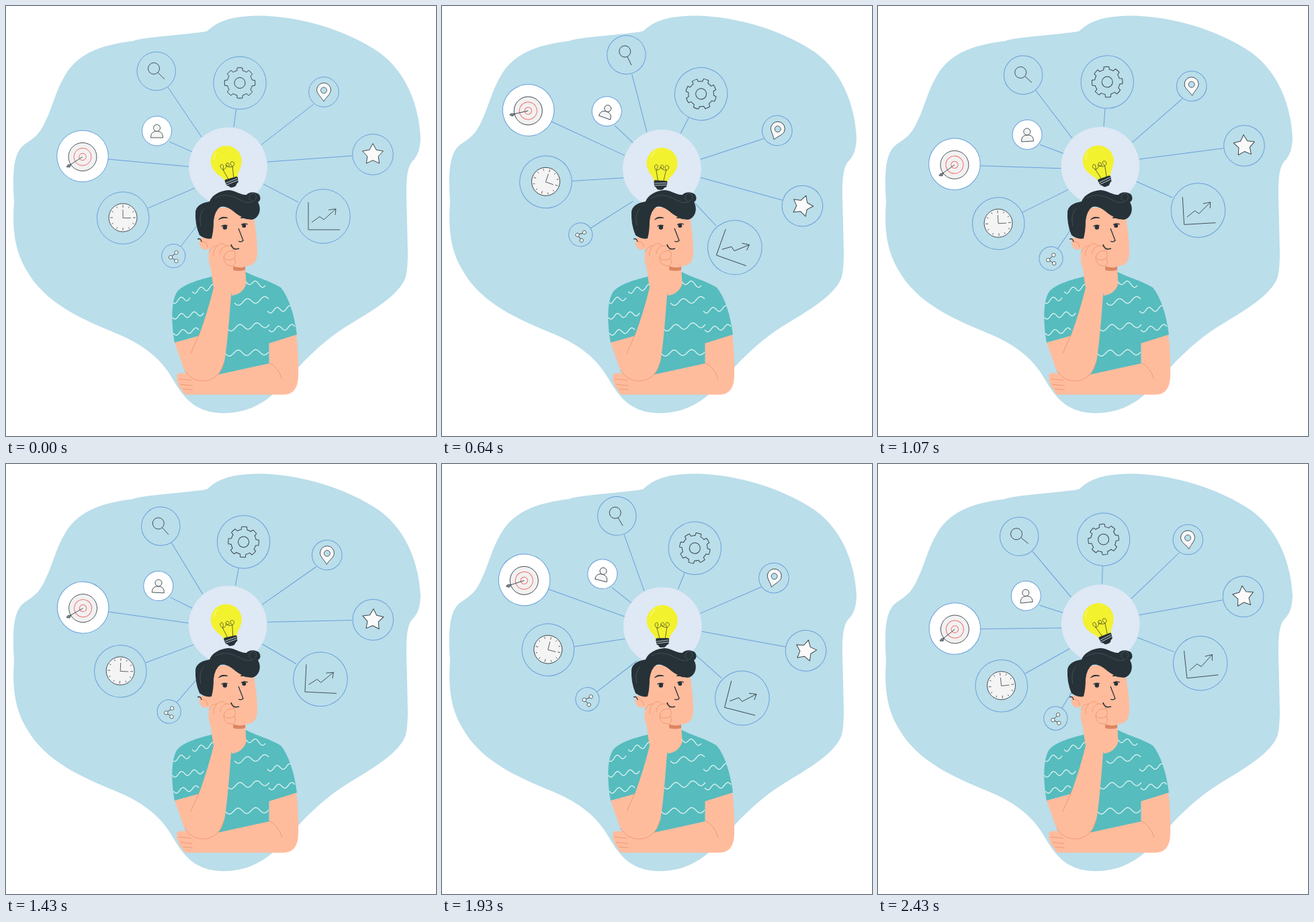
An HTML page with a canvas for the animation above (8000 ms loop, 640 by 640 pixels).

```html
<!DOCTYPE html>
<html lang="en">
<head>
<meta charset="utf-8">
<title>Thinking of ideas</title>
<style>
html, body { margin: 0; width: 100%; height: 100%; overflow: hidden; background: #fff; }
canvas { display: block; width: 640px; height: 640px; }
</style>
</head>
<body>
<canvas id="stage" width="640" height="640"></canvas>
<script>
const ctx = document.getElementById('stage').getContext('2d');
const LOOP = 8000, STEP = 500 / 7, LAST = 34;
const PIVOT = [319.5, 231.5];
const SKY = '#badeea', BLUE = '#6a9fdb', DARK = '#263238', INK = '#3a464c';
const SKIN = '#ffbc9d', FOLD = '#ee9a75', SHIRT = '#56bcbe', PALE = '#f4f4f4', RED = '#f26d6d';

// swing of the idea wheel: [step, degrees]
const KEYS = [[0, 0], [4, 10.9], [9, 19.6], [10, 19.9], [15, -3.3], [16.7, -6],
  [20, 2.75], [24, 18.1], [25, 19.1], [27, 14.45], [34, -6]];

function slope(i) {
  if (i < 1) return 2.9;
  if (i > KEYS.length - 2) return -1.5;
  const [a, b, c] = [KEYS[i - 1], KEYS[i], KEYS[i + 1]];
  const l = (b[1] - a[1]) / (b[0] - a[0]), r = (c[1] - b[1]) / (c[0] - b[0]);
  return l * r <= 0 ? 0 : 2 * l * r / (l + r);
}

function swing(k) {
  let i = 0;
  while (i < KEYS.length - 2 && k > KEYS[i + 1][0]) i++;
  const [x0, y0] = KEYS[i], [x1, y1] = KEYS[i + 1];
  const h = x1 - x0, u = (k - x0) / h, v = 1 - u;
  return y0 * v * v * (1 + 2 * u) + y1 * u * u * (3 - 2 * u)
    + h * u * v * (slope(i) * v - slope(i + 1) * u);
}

function paint(path, fill, line, width = 1) {
  if (fill) { ctx.fillStyle = fill; ctx.fill(path); }
  if (line) { ctx.strokeStyle = line; ctx.lineWidth = width; ctx.stroke(path); }
}
const shape = (d, fill, line, width) => paint(new Path2D(d), fill, line, width);

function disc(x, y, r, fill, line, width) {
  const p = new Path2D();
  p.arc(x, y, r, 0, 7);
  paint(p, fill, line, width);
}

function star(x, y, outer, inner) {
  const p = new Path2D();
  for (let i = 0; i < 10; i++) {
    const a = (i / 5 - 0.5) * Math.PI, r = i % 2 ? inner : outer;
    p.lineTo(x + r * Math.cos(a), y + r * Math.sin(a));
  }
  p.closePath();
  paint(p, '#fafafa', INK, 1);
}

function gear(x, y, teeth, outer, inner) {
  const p = new Path2D();
  for (let i = 0; i < teeth; i++) {
    const a = (i / teeth * 2 - 0.5) * Math.PI, half = Math.PI / teeth;
    p.arc(x, y, outer, a - 0.17, a + 0.17);
    p.arc(x, y, inner, a + 0.23, a + 2 * half - 0.23);
  }
  p.closePath();
  paint(p, null, INK, 1);
}

function wave(x0, y0, x1, y1, cycles, amp = 3.6) {
  const p = new Path2D();
  for (let i = 0; i <= 48; i++) {
    const u = i / 48;
    p.lineTo(x0 + (x1 - x0) * u, y0 + (y1 - y0) * u + amp * Math.sin(u * cycles * 2 * Math.PI));
  }
  paint(p, null, '#e0f3f3', 1.3);
}

function backdrop() {
  shape(`M300 37C320 17 352 14 384 14.500C442 17 503 36 546 63C594 91 615 147 617 197
    C616 216 612 224 604 232C592 247 597 291 597 323L598 368Q598 390 595 403
    C586 430 546 453 508 476C481 493 458 513 435 538C401 579 374 606 322 606
    C285 605 266 587 248 555C229 522 203 504 166 488C112 466 58 442 31 394
    C10 359 10 325 12 291C10 257 9 223 25 208C42 196 49 193 59 171
    C69 151 74 126 88 103C108 68 148 57 190 52C198 47 265 43 297 38Z`, SKY);
}

function bulb() {
  ctx.save();
  ctx.translate(327.8, 231);
  ctx.rotate(-0.27);
  shape('M-10 28C-11 21 -16 19 -19 13A23 23 0 1 1 19 13C16 19 11 21 10 28Z', '#f3f22f');
  shape('M-17 -7Q-15 -14 -10 -17', null, '#faf99a', 1);
  shape(`M-4 27L-8 11C-12 7 -11 3 -8 3C-5 3 -6 8 -8 11C-4 11 -2 9 -2 6C-2 2 3 2 3 6
    C3 10 -2 9 -1 6C0 9 4 11 7 10C4 7 5 2 8 3C12 4 11 9 7 10L4 27`, null, '#4d522c', 0.8);
  shape('M-10 28Q-10 26 -8 26H8Q10 26 10 28L9 35Q6 36 5 38Q4 40 1 40H-2Q-5 40 -6 37L-9 35Z', DARK);
  shape('M-9 31L9 29M-9 34L9 32', null, '#dce4ec', 0.8);
  ctx.restore();
}

function links() {
  shape(`M241 121L291 195M342.500 154L339 180M458 146L380 206.500M515 223L389 232
    M435 292L383 265M260 358L306 299M211 301L281 271M152 228L272 239M243 202L277 217`, null, BLUE, 1);
}

function rings() {
  const ring = (x, y, r, fill) => disc(x, y, r, fill, BLUE, 1);
  ring(223.7, 97, 28.7);
  ring(348, 114.5, 39.2);
  ring(473, 128, 22.3);
  ring(546, 221, 30.3);
  ring(472, 313, 40.3);
  ring(249.3, 372, 17.6);
  ring(174.2, 315.5, 38.8);
  ring(114, 223.5, 38.3, '#fff');
  ring(224.5, 186, 22, '#fff');
}

function icons() {
  const ink = (d, fill, w = 0.9) => shape(d, fill, INK, w);
  // magnifier
  disc(220, 93, 8.5, null, INK, 0.9);
  ink('M226 99L236 109');
  gear(348, 114.5, 8, 22.8, 18.8);
  disc(348, 114.5, 8, null, INK, 1);
  // map pin
  ink('M473 142C469 135 462.500 131 462.500 125A10.500 10.500 0 0 1 483.500 125C483.500 131 477 135 473 142Z', '#f8f8f8');
  disc(473, 125.5, 4.5, SKY, INK, 0.8);
  ctx.lineJoin = 'round';
  star(546, 221, 16.3, 8.6);
  // chart
  ink('M450 292V333H497M455 322L467 313.500L473 318L491 302M480 303.500L491 302L490 311');
  // share
  ink('M254 367L245 374L254 379.500');
  for (const [x, y] of [[245, 374], [253.5, 367], [253.5, 379.5]]) disc(x, y, 2.7, '#fff', INK, 0.8);
  // clock
  disc(174, 315, 21, PALE, INK, 0.9);
  for (let i = 0; i < 12; i++) {
    const a = i * Math.PI / 6, c = Math.cos(a), s = Math.sin(a), r = i % 3 ? 16.5 : 15;
    ink(`M${174 + r * c} ${315 + r * s}L${174 + 19 * c} ${315 + 19 * s}`, null, 0.8);
  }
  ink('M174 303V315.500H186', null, 0.8);
  // target
  disc(114, 224.5, 21, '#f1f1f1', INK, 0.9);
  disc(114, 224.5, 13, null, RED, 1);
  disc(114, 224.5, 5.2, null, RED, 1);
  ink('M114 224.500L92 238.500');
  ink('M97 235.500L95 240L90 239.500L92 236.500Z', '#78838a', 0.7);
  // person
  ink('M215.500 196C215.500 189 219 186.500 224.500 186.500C230 186.500 233.500 189 233.500 196Z', PALE);
  disc(224.5, 181.5, 5, PALE, INK, 0.9);
}

function wheel(deg) {
  ctx.save();
  ctx.translate(...PIVOT);
  ctx.rotate(deg * Math.PI / 180);
  ctx.translate(-PIVOT[0], -PIVOT[1]);
  links();
  disc(330.5, 239, 58.3, '#dfe8f5');
  rings();
  icons();
  bulb();
  ctx.restore();
}

function torso() {
  // folded arm
  shape(`M391 500L432 487Q436 520 435 552Q434 578 413 578.500H268Q263 577 262 571
    Q256 568 257 562Q252 558 255 554Q252 548 258 546.500Q268 545 281 550L318 547L392 531Z`, SKIN);
  shape('M257 555L276 557M259 563L277 565M263 570L278 571M391 531Q405 536 411 556', null, FOLD, 1);
  // shirt
  const shirt = new Path2D(`M309 402C289 407 266 413 255 425C245 439 246 473 251 501L288 491L300 552
    L318 548L391.500 532V502L433 489C429 459 421 434 409 419C391 408 372 404 357 396Z`);
  paint(shirt, SHIRT);
  ctx.save();
  ctx.clip(shirt);
  wave(247, 440, 274, 434, 1.5);
  wave(277, 425, 312, 417, 2);
  wave(247, 463, 294, 457, 2.5);
  wave(249, 487, 287, 482, 2);
  wave(340, 442, 391, 436, 2, 4.2);
  wave(329, 480, 392, 474, 2.5, 4.2);
  wave(326, 517, 391, 515, 2.5, 4.2);
  wave(357, 410, 386, 416, 1.5);
  wave(389, 454, 427, 449, 2);
  wave(391, 482, 430, 477, 2);
  ctx.restore();
}

function head() {
  // neck
  shape('M333 375L356 386L357.500 414Q352 429 336 431L330 400Z', SKIN);
  shape('M334 386Q346 391 356 388V393Q346 396 334 392Z', '#dc8561');
  // ear and face
  shape('M305 344Q292 341 288 348Q286 357 293 362Q299 364 306 360Z', SKIN);
  shape('M291 351Q299 349 300 359', null, FOLD, 1);
  shape(`M303 300L366 300Q370 316 371 329Q374 349 374 366Q374 381 366 385Q352 391 338 387
    Q314 381 303 357Z`, SKIN);
  // hair
  shape(`M306 346Q297 348 288 341Q281 325 282 306Q284 294 303 291
    C306 283 316 275 331 274C344 275 349 282 358 281C362 276 372 276 377 281
    Q381 288 375 292C381 302 377 316 366 318C353 318 343 309 335 303
    Q326 297 319 299Q311 304 309 320Q309 335 306 346Z`, DARK);
  shape('M311 286C329 276 342 286 354 291C365 296 377 288 371 280C365 275 357 287 366 290M290 327Q286 310 295 301',
    null, '#465960', 0.8);
  shape('M285 347Q290 345 291 351', null, DARK, 1.3);
  // features
  shape('M316.500 318Q321 312 330 315.500Q322 314.500 316.500 318ZM349 315.500Q354 312 359 317Q354 314.500 349 315.500Z', DARK, DARK, 1);
  disc(325.8, 329.5, 3.2, DARK);
  disc(354.3, 327, 3, DARK);
  shape('M320.500 328Q324 325 330 327M350 325.500Q354 322.500 360 325', null, DARK, 1.2);
  shape('M346 331L353 349Q350 352 346 350', null, DARK, 1.3);
  shape('M335 355Q337 364 347 361', null, DARK, 1.7);
  for (const [x, y] of [[323, 341], [327, 345], [331, 340], [334, 346], [361, 341], [365, 345]])
    disc(x, y, 0.7, '#f8ac8c');
}

function arm() {
  shape(`M251 501L287 491Q301 453 309 419Q306 403 305 391Q300 379 302 366Q306 357 314 357
    Q321 350 328 357Q336 356 339 364Q343 369 340 376Q344 381 338 387
    Q339 401 336 419C333 455 330 500 326 524Q322 548 305 556
    Q290 563 276 554Q268 548 264 538Z`, SKIN);
  shape('M275 517L288 488M266 542C277 561 301 563 315 549Q321 543 324 531', null, FOLD, 1);
  shape(`M302 366Q306 357 314 357Q321 350 328 357Q336 356 339 364Q343 369 340 376Q344 381 338 387
    M314 357Q308 364 309 372M328 357Q318 361 319 369M339 364Q326 364 324 374
    Q327 381 340 376M324 374Q324 383 331 386M331 386L338 387`, null, FOLD, 1);
}

function draw(ms) {
  const k = Math.min(LAST, Math.floor((ms % LOOP + 5) / STEP));
  ctx.fillStyle = '#fff';
  ctx.fillRect(0, 0, 640, 640);
  backdrop();
  wheel(swing(k));
  torso();
  head();
  arm();
}

const start = performance.now();
function tick() {
  draw(performance.now() - start);
  requestAnimationFrame(tick);
}
tick();
</script>
</body>
</html>
```
